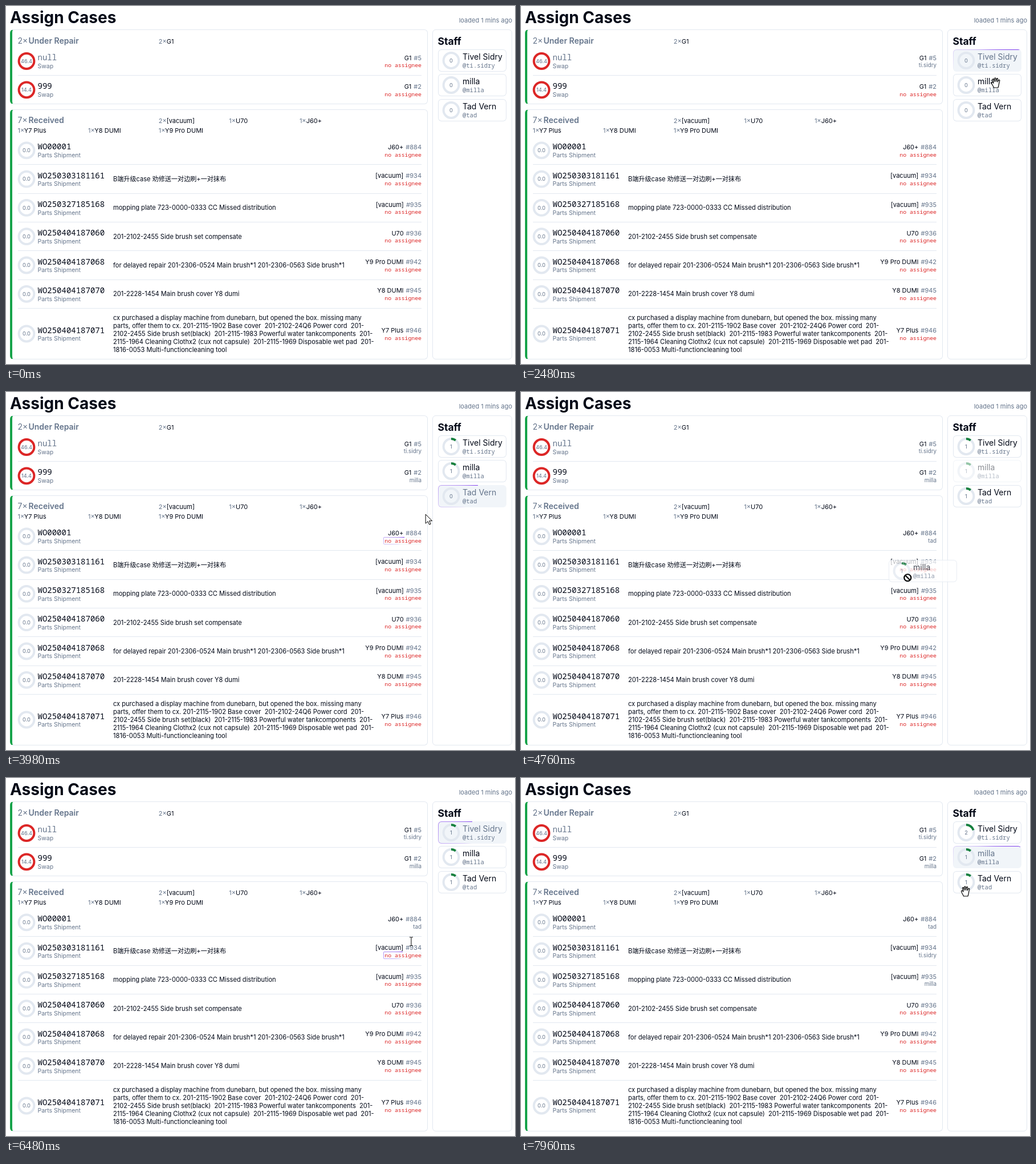
These frames come from a looping animation (893x627 px, 8 s). An HTML page:

```html
<!DOCTYPE html>
<html lang="en">
<head>
<meta charset="utf-8">
<title>Assign Cases</title>
<style>
  html, body { margin: 0; width: 100%; height: 100%; overflow: hidden; background: #fff; }
  #stage { position: absolute; left: 0; top: 0; width: 893px; height: 627px; overflow: hidden; }
  #stage div, #stage svg { position: absolute; box-sizing: border-box; }
  svg { overflow: visible; left: 0; top: 0; }
  text { font-family: Inter, "Noto Sans CJK SC", "Noto Sans CJK", sans-serif; fill: #020817; white-space: pre; }
  .mono { font-family: "Noto Sans Mono", monospace; }
  .mute { fill: #64748b; }
  .red { fill: #dc2626; }
  .semi { font-weight: 600; }
  .bold { font-weight: 700; }
  .card { border: 1px solid #e2e8f0; border-radius: 6px; }
  .group { border-left: 4px solid #16a34a; }
  .zone { background: #f1f5f9; border-radius: 5px; }
  .beam { border-radius: 2px; }
  .beam .face { border-radius: 1px; }
  .staff { width: 120px; height: 39px; border-radius: 6px; background: #e2e8f0; }
  .face { inset: 1px; border-radius: 5px; background: #fff; }
  .busy .face { background: #f1f5f9; }
  .busy .name { fill: #64748b; }
</style>
</head>
<body>
<div id="stage"></div>
<script>
const NS = 'http://www.w3.org/2000/svg';
const stage = document.getElementById('stage');
const LOOP = 8000, STEP = 78.4, START = 750;

function box(parent, cls, x, y, w, h) {
  const d = document.createElement('div');
  d.className = cls;
  if (x !== undefined) { d.style.left = x + 'px'; d.style.top = y + 'px'; }
  if (w) { d.style.width = w + 'px'; d.style.height = h + 'px'; }
  parent.append(d);
  return d;
}
function el(parent, tag, attrs = {}, text) {
  const e = document.createElementNS(NS, tag);
  for (const k in attrs) e.setAttribute(k, attrs[k]);
  if (text !== undefined) e.textContent = text;
  parent.append(e);
  return e;
}
// y is the middle of the capitals
const label = (parent, x, y, size, cls, text, anchor = 'start') =>
  el(parent, 'text', { x, y: y + size * 0.36, 'font-size': size, class: cls, 'text-anchor': anchor }, text);

function ring(parent, x, y, text, color = '#e2e8f0') {
  el(parent, 'circle', { cx: x, cy: y, r: 13.4, fill: 'none', stroke: color, 'stroke-width': 4 });
  return label(parent, x, y, 9.3, 'mute', text, 'middle');
}
const show = (e, on) => { e.style.display = on ? '' : 'none'; };

// Layout
box(stage, 'card group', 7, 41, 733, 131);
box(stage, 'card group', 7, 181, 733, 438);
box(stage, 'card', 748, 41, 140, 578);
const zone = box(stage, 'zone');
const beam = box(stage, 'beam', 662, 304, 67, 13);
box(beam, 'face');
const page = el(stage, 'svg', { width: 893, height: 627 });

label(page, 7, 20, 28, 'bold', 'Assign Cases');
label(page, 888, 25.5, 11, 'mute', 'loaded 1 mins ago', 'end');
label(page, 757.5, 61.5, 17.5, 'bold', 'Staff');

function heading(y, count, title, items) {
  label(page, 20.5, y, 14, 'mute', count + '×');
  label(page, 39.5, y, 14, 'mute semi', title);
  for (const [col, row, n, name] of items) {
    const t = label(page, 20.5 + col * 123.6, y + 1.5 + row * 17, 11, 'mute', n + '×');
    el(t, 'tspan', { fill: '#020817' }, name);
  }
}
heading(60.5, 2, 'Under Repair', [[2, 0, 2, 'G1']]);
heading(200, 7, 'Received', [
  [2, 0, 2, '[vacuum]'], [3, 0, 1, 'U70'], [4, 0, 1, 'J60+'],
  [0, 1, 1, 'Y7 Plus'], [1, 1, 1, 'Y8 DUMI'], [2, 1, 1, 'Y9 Pro DUMI']
]);

const PARTS = 'Parts Shipment';
const rows = [
  [96.5, '46.4', 'null', 'Swap', 'G1', 5, ''],
  [146.8, '14.4', '999', 'Swap', 'G1', 2, ''],
  [252.8, '0.0', 'WO00001', PARTS, 'J60+', 884, ''],
  [303.1, '0.0', 'WO250303181161', PARTS, '[vacuum]', 934, 'B端升级case 劝修送一对边刷+一对抹布'],
  [353.4, '0.0', 'WO250327185168', PARTS, '[vacuum]', 935, 'mopping plate 723-0000-0333 CC Missed distribution'],
  [403.7, '0.0', 'WO250404187060', PARTS, 'U70', 936, '201-2102-2455 Side brush set compensate'],
  [454, '0.0', 'WO250404187068', PARTS, 'Y9 Pro DUMI', 942, 'for delayed repair 201-2306-0524 Main brush*1 201-2306-0563 Side brush*1'],
  [504.3, '0.0', 'WO250404187070', PARTS, 'Y8 DUMI', 945, '201-2228-1454 Main brush cover Y8 ambi'.replace('ambi', 'dumi')],
  [574, '0.0', 'WO250404187071', PARTS, 'Y7 Plus', 946,
    'cx purchased a display machine from dunebarn, but opened the box. missing many\n' +
    'parts, offer them to cx. 201-2115-1902 Base cover  201-2102-24Q6 Power cord  201-\n' +
    '2102-2455 Side brush set(black)  201-2115-1983 Powerful water tankcomponents  201-\n' +
    '2115-1964 Cleaning Clothx2 (cux not capsule)  201-2115-1969 Disposable wet pad  201-\n' +
    '1816-0053 Multi-functioncleaning tool']
].map(([y, hours, id, kind, model, num, note], i) => {
  ring(page, 36, y, hours, i < 2 ? '#dc2626' : undefined);
  label(page, 55.5, y - 6.5, 14, id === 'null' ? 'mono mute' : 'mono', id);
  label(page, 55.5, y + 8.5, 10.5, 'mute', kind);
  const lines = note.split('\n');
  lines.forEach((s, k) => label(page, 188, y + (k - (lines.length - 1) / 2) * 14.2, 11.1, '', s));
  const m = label(page, 729, y - 5.8, 11, '', model, 'end');
  el(m, 'tspan', { dx: 4, class: 'mute' }, '#' + num);
  if (i !== 1 && i !== 8) el(page, 'path', { d: `M21 ${Math.round(y + 24.6) + .5}H729`, stroke: '#e2e8f0' });
  return {
    y,
    none: label(page, 729, y + 7.2, 9.8, 'mono red', 'no assignee', 'end'),
    owner: label(page, 729, y + 7.2, 9.8, 'mute', '', 'end')
  };
});

// Staff
const people = [['Tivel Sidry', 'ti.sidry'], ['milla', 'milla'], ['Tad Vern', 'tad']];
const cardY = i => 76 + i * 43.3;

function staffCard(x, y) {
  const root = box(stage, 'staff', x, y);
  box(root, 'face');
  const g = el(root, 'svg', { width: 120, height: 39 });
  const num = ring(g, 23, 19.5, '0');
  const arc = el(g, 'circle', {
    cx: 23, cy: 19.5, r: 13.4, fill: 'none', stroke: '#15803d', 'stroke-width': 4,
    pathLength: 10, transform: 'rotate(-90 23 19.5)'
  });
  const name = label(g, 43, 13, 14, 'name', '');
  const handle = label(g, 43, 28.3, 10.5, 'mono mute', '');
  return {
    root,
    fill(who, n) {
      name.textContent = people[who][0];
      handle.textContent = '@' + people[who][1];
      num.textContent = n;
      arc.setAttribute('stroke-dasharray', n + ' 10');
      show(arc, n > 0);
    }
  };
}
const cards = people.map((p, i) => staffCard(758, cardY(i)));
const ghost = staffCard(0, 0);
ghost.root.style.opacity = 0.72;

// Cursors
const layer = el(stage, 'svg', { width: 893, height: 627 });
const cursor = el(layer, 'g');
const ink = { fill: '#fff', stroke: '#000', 'stroke-width': 1, 'stroke-linejoin': 'round' };
const shapes = {};
for (const k of ['arrow', 'hand', 'stop', 'bar']) shapes[k] = el(cursor, 'g');
el(shapes.arrow, 'path', { ...ink, d: 'M0 0V16L4 12.5L6.5 18L9 17L6.5 11.5H11.5Z' });
el(shapes.hand, 'path', { ...ink, 'stroke-width': 1.2, d:
  'M-3.5 9C-5 5-8 2-7.5 0C-6.8-1.5-5 0-4 1L-5.5-5C-5.5-6.8-3.8-6.8-3.3-5.2L-2.3-1.5L-2.2-7' +
  'C-2-8.6-.2-8.6 0-7L.3-1.6L1.6-6.6C2.2-8 3.8-7.4 3.6-6L2.9-1L5-4C6-5.2 7.3-4.2 6.8-3C5.5 0 5.5 5 4 9Z' });
el(shapes.stop, 'circle', { r: 6, fill: '#fff', stroke: '#000', 'stroke-width': 2.2 });
el(shapes.stop, 'path', { d: 'M-4-4L4 4', stroke: '#000', 'stroke-width': 2.2 });
el(shapes.bar, 'path', { d: 'M-3-7.5H-1L0-7L1-7.5H3M0-7V7M-3 7.5H-1L0 7L1 7.5H3', fill: 'none', stroke: '#000' });

// time, x, y, shape from then on
const path = [
  [750, 783, 274, 'arrow'], [985, 793, 170, 'hand'], [1140, 812, 90, 'hand'], [1220, 812, 98, 'hand'],
  [1540, 812, 98, 'hand'], [1860, 690, 87, 'arrow'],
  [2090, 690, 87, 'arrow'], [2330, 780, 118, 'hand'], [2480, 833, 134, 'hand'],
  [2550, 833, 134, 'hand'], [2800, 708, 147, 'arrow'],
  [3030, 708, 147, 'arrow'], [3180, 775, 172, 'hand'], [3270, 806, 187, 'hand'],
  [3340, 806, 187, 'hand'], [3660, 700, 253, 'arrow'],
  [3820, 700, 253, 'arrow'], [4120, 768, 180, 'hand'], [4290, 791, 154, 'hand'],
  [4440, 791, 150, 'hand'], [4760, 678, 325, 'arrow'], [4900, 690, 335, 'arrow'], [5070, 700, 325, 'arrow'],
  [5230, 700, 325, 'arrow'], [5390, 780, 180, 'hand'], [5540, 834, 97, 'hand'],
  [5610, 834, 97, 'hand'], [5850, 752, 210, 'arrow'], [6010, 708, 277, 'arrow'],
  [6080, 708, 277, 'arrow'], [6330, 708, 291, 'bar'],
  [6480, 708, 291, 'bar'], [6640, 765, 200, 'hand'], [6800, 800, 140, 'hand'],
  [6870, 800, 140, 'hand'], [7270, 700, 362, 'arrow'],
  [7500, 700, 362, 'arrow'], [7740, 755, 250, 'hand'], [7960, 780, 198, 'hand']
];

// who, grab, drop, row, offset in card, entering the row, assigned, reloaded
const drags = [
  [0, 1620, 2090, 0, 54, 21, 1780, 2330, 2640],
  [1, 2560, 3030, 1, 75, 15, 2720, 3190, 3590],
  [2, 3350, 3820, 2, 48, 24, 3580, 3980, 4280],
  [1, 4440, 5230, -1, 33, 31, LOOP],
  [0, 5620, 6480, 3, 76, 21, 6090, 6640, 7110],
  [1, 6880, 7570, 4, 42, 21, 7190, 7720, LOOP + 500]
].map(([who, grab, drop, row, dx, dy, over, assigned, done]) =>
  ({ who, grab, drop, row, dx, dy, over, assigned, done }));

function pointer(t) {
  let i = 0;
  while (i < path.length - 1 && path[i + 1][0] <= t) i++;
  const a = path[i], b = path[i + 1] || a;
  const f = b === a ? 0 : (t - a[0]) / (b[0] - a[0]);
  return { x: a[1] + (b[1] - a[1]) * f, y: a[2] + (b[2] - a[2]) * f, kind: a[3] };
}
const sweep = (e, age) => {
  e.style.background =
    `conic-gradient(from ${180 + age * 0.18}deg, #f1f5f9, #7c3aed 180deg, #f1f5f9 180deg)`;
};

function draw(time) {
  // the screen refreshes on a coarse tick
  const t = time < START ? time : START + STEP * Math.floor((time - START) / STEP + 0.06) + 15;
  const p = pointer(t);
  const held = drags.find(d => t >= d.grab && t < d.drop);
  const over = held && t >= held.over;
  const counts = people.map((_, i) => drags.filter(d => d.who === i && t >= d.done).length);

  cards.forEach((c, i) => {
    const busy = drags.find(d => d.who === i && t >= d.drop && t < d.done);
    c.fill(i, counts[i]);
    c.root.classList.toggle('busy', !!busy);
    c.root.style.opacity = held && held.who === i ? 0.45 : 1;
    if (busy) sweep(c.root, t - busy.drop);
    else c.root.style.background = '';
  });

  rows.forEach((r, i) => {
    const d = drags.find(d => d.row === i && t >= d.assigned);
    show(r.none, !d);
    r.owner.textContent = d ? people[d.who][1] : '';
  });

  const wait = drags.find(d => t >= d.drop && t < d.assigned);
  show(beam, wait);
  if (wait) {
    beam.style.top = rows[wait.row].y + 1 + 'px';
    sweep(beam, t - wait.drop);
  }

  show(zone, over);
  if (over) {
    const x = held.row < 2 ? 101 : 185;
    Object.assign(zone.style, {
      left: x + 'px', width: 732 - x + 'px', top: rows[held.row].y - 23 + 'px', height: '46px'
    });
  }

  show(ghost.root, held);
  if (held) {
    ghost.fill(held.who, counts[held.who]);
    ghost.root.style.left = p.x - held.dx + 'px';
    ghost.root.style.top = p.y - held.dy + 'px';
  }

  const kind = held ? (over ? 'arrow' : 'stop') : p.kind;
  show(cursor, time >= START);
  cursor.setAttribute('transform', `translate(${p.x} ${p.y})`);
  for (const k in shapes) show(shapes[k], k === kind);
}

function tick() {
  draw(performance.now() % LOOP);
  requestAnimationFrame(tick);
}
tick();
</script>
</body>
</html>
```
